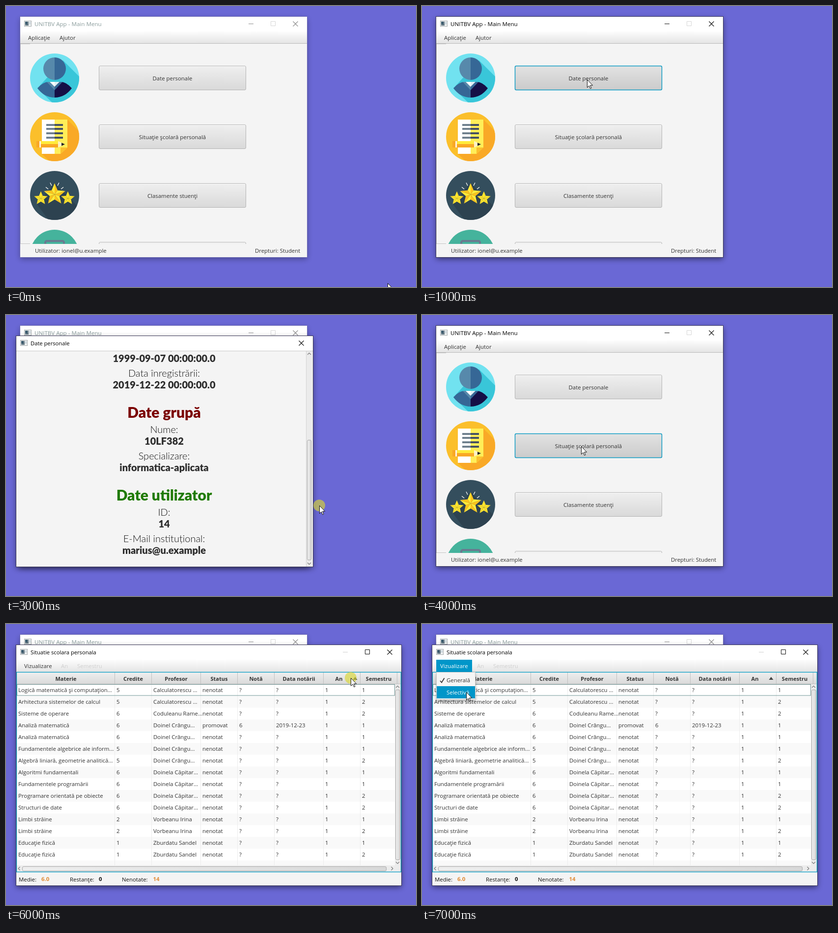
Recreate the animation shown at these times as an HTML page. Size 835 px wide and 574 px high, loop 8 s.

```html
<!DOCTYPE html>
<html lang="ro">
<head>
<meta charset="utf-8">
<title>Main Menu</title>
<style>
html, body { margin: 0; width: 100%; height: 100%; overflow: hidden; background: #6a68d5; }
svg { display: block; width: 835px; height: 574px; }
text { font: 11.4px "Open Sans", "Noto Sans", sans-serif; fill: #323232; white-space: pre; }
.mid { text-anchor: middle; }
.bold { font-weight: 700; font-size: 11px; }
.head { font: 900 30px Lato, sans-serif; }
.label { font: 300 20px Lato, sans-serif; fill: #111; }
.value { font: 900 20px Lato, sans-serif; fill: #2d2d2d; }
</style>
</head>
<body>
<svg viewBox="0 0 835 574">
  <defs>
    <linearGradient id="bar" x2="0" y2="1"><stop stop-color="#fdfdfd"/><stop offset="1" stop-color="#e4e4e4"/></linearGradient>
    <linearGradient id="btn" x2="0" y2="1"><stop stop-color="#efefef"/><stop offset="1" stop-color="#d9d9d9"/></linearGradient>
    <linearGradient id="press" x2="0" y2="1"><stop stop-color="#e2e2e2"/><stop offset="1" stop-color="#cbcbcb"/></linearGradient>
    <linearGradient id="thumb"><stop stop-color="#eeeeee"/><stop offset="1" stop-color="#d8d8d8"/></linearGradient>
    <filter id="soft" x="-10%" y="-10%" width="120%" height="120%"><feGaussianBlur stdDeviation="6"/></filter>
    <filter id="near" x="-20%" y="-20%" width="140%" height="150%"><feGaussianBlur stdDeviation="3"/></filter>
    <clipPath id="menuClip"><rect x="29" y="77" width="584" height="409"/></clipPath>
    <clipPath id="docClip"><rect x="22" y="74" width="589" height="439"/></clipPath>
    <clipPath id="disc"><circle r="50"/></clipPath>
  </defs>
  <g id="scene"></g>
</svg>
<script>
const STEP = 1000;
const steps = [
  { mouse: [777, 566] },
  { active: true, pressed: 0, mouse: [336, 150] },
  { view: "details", scroll: 0, mouse: [607, 190] },
  { view: "details", scroll: 299, mouse: [638, 389], click: true },
  { active: true, pressed: 1, mouse: [324, 268] },
  { view: "grades", mouse: [380, 188] },
  { view: "grades", sorted: true, mouse: [702, 110], click: true },
  { view: "grades", sorted: true, menu: true, mouse: [90, 139] }
];

const rect = (x, y, w, h, fill, more = "") =>
  `<rect x="${x}" y="${y}" width="${w}" height="${h}" fill="${fill}" ${more}/>`;
const text = (x, y, str, cls = "", style = "") =>
  `<text x="${x}" y="${y}" class="${cls}" style="${style}">${str}</text>`;
const path = (d, fill, more = "") => `<path d="${d}" fill="${fill}" ${more}/>`;
const line = (d, color, width = 1) => path(d, "none", `stroke="${color}" stroke-width="${width}"`);
const group = (attrs, body) => `<g ${attrs}>${body}</g>`;
const at = (x, y, body) => group(`transform="translate(${x} ${y})"`, body);

function appIcon(x, y) {
  return at(x, y, rect(.5, .5, 14, 11, "#f2f4f4", 'stroke="#a3a8aa"') +
    rect(2, 2, 7, 8, "#667a86") + rect(2, 2, 4, 5, "#33566a") +
    rect(10, 3, 3, 1, "#9db3c4") + rect(10, 5, 3, 1, "#9db3c4") + rect(10, 7, 3, 1, "#c3ccd2"));
}

function frame(x, y, w, h, title, o) {
  const mid = y + (o.mid || 15), right = x + w;
  let s = rect(x, y + 4, w, h, "#000", `filter="url(#soft)" opacity="${o.active ? .5 : .32}"`) +
    rect(x - 1, y - 1, w + 2, h + 2, o.active ? "#3c3a58" : "#7472b4") +
    rect(x, y, w, h, "#f4f4f4") + rect(x, y, w, 30, "#fff") +
    appIcon(x + 8, mid - 7) +
    text(x + 29, mid + 4, title, "", `font-size:${o.size || 11.2}px;fill:${o.active ? "#000" : "#8a9c9c"}`);
  const ink = o.active ? "#111" : "#8c8c8c";
  s += line(`M${right - 28.5} ${mid - 5.5}l10 10m0 -10l-10 10`, ink, 1.1);
  if (o.sizable) {
    s += line(`M${right - 119} ${mid - .5}h10`, o.min || ink) +
      line(`M${right - 73.5} ${mid - 5.5}h9v9h-9z`, o.max || "#d6d6d6");
  }
  return s;
}

function person() {
  const body = "M-35 21Q-24 8 -12 8H12Q24 8 35 21Q21 40 0 40Q-21 40 -35 21Z";
  const half = (x, w, d, fill) => `<svg x="${x}" y="-50" width="${w}" height="100" viewBox="${x} -50 ${w} 100">${path(d, fill)}</svg>`;
  const head = "M0 -42a23 23 0 0 1 0 46a23 23 0 0 1 0 -46z";
  return path("M17 -36L60 7V60H5L-35 21Z", "#39c6d9") +
    half(-50, 50, head, "#5789ab") + half(0, 50, head, "#366796") +
    half(-50, 50, body, "#366796") + half(0, 50, body, "#150f46") +
    path("M-16 8H-10L0 18V25Z", "#5789ab") + path("M16 8H10L0 18V25Z", "#366796") +
    path("M-10 8H0V18Z", "#fff") + path("M10 8H0V18Z", "#dff1f6");
}

function sheet() {
  let s = path("M26 -35L60 -1V60H0L-26 35Z", "#f9a927") +
    rect(-26, -35, 26, 70, "#fff") + path("M0 -35H26V22L12 35H0Z", "#ffee58") +
    path("M26 22H12V35Z", "#fbc02d");
  for (const y of [-26, -18, -9, 0]) s += rect(-17, y, 17, 4, "#6f808e") + rect(0, y, 17, 4, "#455062");
  return s + rect(-37, 9, 6, 13, "#f9a825") + rect(-31, 9, 3, 13, "#fff3e0") +
    rect(-28, 9, 35, 6, "#ffeb3b") + rect(-28, 15, 35, 7, "#f9a825") +
    path("M7 9L21 15.5L7 22Z", "#fff3c4") + path("M14 12.3L21 15.5L14 18.7Z", "#222");
}

function star(x, y, r, light, dark) {
  const pt = k => {
    const a = k * Math.PI / 5 - Math.PI / 2, d = k % 2 ? r * .45 : r;
    return `${(x + d * Math.cos(a)).toFixed(1)} ${(y + d * Math.sin(a)).toFixed(1)}`;
  };
  let s = "";
  for (let k = 0; k < 10; k++) s += path(`M${x} ${y}L${pt(k)}L${pt(k + 1)}Z`, k % 2 ? light : dark);
  return s;
}

function stars() {
  return path("M0 -25L60 35V60H-5L-36 18Z", "#2d4250") +
    star(-28, 6, 14.5, "#ffe92e", "#ffe02a") + star(27, 6, 14.5, "#ffe92e", "#ffe02a") +
    star(0, -2, 23, "#ffeb3b", "#fdc41c") +
    line("M-18 -17l5 4M-9 -26l3 6M9 -26l-3 6M18 -17l-5 4", "#f4f4f4", 1.4);
}

const board = () => rect(-19, -27, 38, 50, "none", 'rx="3" stroke="#697a90" stroke-width="4"');

const entries = [
  ["Date personale", "#71e2f0", person],
  ["Situație școlară personală", "#fbbf2b", sheet],
  ["Clasamente stuenți", "#344e5d", stars],
  ["", "#45b39c", board]
];

function mainWindow({ active, pressed }) {
  const items = entries.map(([label, color, icon], i) => {
    const y = 147 + i * 120, on = i === pressed;
    return at(99, y, `<circle r="50" fill="${color}"/>` + group('clip-path="url(#disc)"', icon())) +
      rect(189.5, y - 24.5, 299, 49, on ? "url(#press)" : "url(#btn)",
        `rx="2.5" stroke="${on ? "#0f9cc4" : "#b4b4b4"}" stroke-width="${on ? 1.5 : 1}"`) +
      (on ? "" : line(`M191 ${y - 23.5}h296`, "#fafafa")) +
      text(339, y + 5, label, "mid");
  }).join("");
  return frame(29, 22, 584, 491, "UNITBV App - Main Menu", { active, sizable: true, size: 11.6 }) +
    rect(29, 52, 584, 24, "url(#bar)") + rect(29, 76, 584, 1, "#b9b9b9") +
    text(45, 69, "Aplicație") + text(109, 69, "Ajutor") +
    rect(29, 77, 1, 409, "#d0d0d0") + rect(29, 77, 20, 1, "#c4c4c4") + rect(29, 485, 20, 1, "#c4c4c4") +
    group('clip-path="url(#menuClip)"', items) +
    text(59, 504, "Utilizator: ionel@u.example") + text(507, 504, "Drepturi: Student");
}

const arrows = {
  up: "M-3.5 2L0 -1.5L3.5 2", down: "M-3.5 -2L0 1.5L3.5 -2",
  left: "M2 -3.5L-1.5 0L2 3.5", right: "M-2 -3.5L1.5 0L-2 3.5"
};
const arrow = (dir, x, y) => at(x, y, line(arrows[dir], "#777", 1.1));
const thumb = (x, y, w, h) => rect(x + .5, y + .5, w - 1, h - 1, "url(#thumb)", 'rx="2.5" stroke="#aaa"');

const sections = [
  [124, "Date student", "#00007b", [
    ["Nume:", "Marius Plopănel"], ["Legitimație:", "1664"], ["CNP:", "1990907000017"],
    ["Domiciliu:", "Codlea, Brașov"], ["Data nașterii:", "1999-09-07 00:00:00.0"],
    ["Data înregistrării:", "2019-12-22 00:00:00.0"]]],
  [509, "Date grupă", "#7b0000", [["Nume:", "10LF382"], ["Specializare:", "informatica-aplicata"]]],
  [678, "Date utilizator", "#1f7a00", [["ID:", "14"], ["E-Mail instituțional:", "marius@u.example"]]]
];

function details({ scroll }) {
  const doc = sections.map(([y, title, color, rows]) =>
    text(322, y, title, "head mid", `fill:${color}`) +
    rows.map(([label, value], i) =>
      text(322, y + 31 + 54 * i, label, "label mid") + text(322, y + 55 + 54 * i, value, "value mid")).join("")
  ).join("");
  return frame(21, 43, 604, 471, "Date personale", { active: true }) +
    rect(21, 73, 604, 1, "#c8c8c8") +
    group('clip-path="url(#docClip)"', at(0, -scroll, doc)) +
    rect(611, 74, 13, 440, "#ebebeb") + rect(611, 74, 1, 440, "#d4d4d4") +
    arrow("up", 617.5, 79) + arrow("down", 617.5, 508) +
    thumb(613, scroll ? 255 : 86, 9, 246);
}

const teachers = ["Calculatorescu ...", "Coduleanu Rame...", "Doinel Crângu...",
  "Doinela Căpitar...", "Vorbeanu Irina", "Zburdatu Sandel"];
// subject, credits, teacher, semester
const courses = [
  ["Analiză matematică", 6, 2, 1, true],
  ["Analiză matematică", 6, 2, 1],
  ["Fundamentele algebrice ale inform...", 5, 2, 1],
  ["Algoritmi fundamentali", 6, 3, 1],
  ["Fundamentele programării", 6, 3, 1],
  ["Logică matematică și computațion...", 5, 0, 1],
  ["Limbi străine", 2, 4, 1],
  ["Educație fizică", 1, 5, 1],
  ["Algebră liniară, geometrie analitică...", 5, 2, 2],
  ["Arhitectura sistemelor de calcul", 5, 0, 2],
  ["Programare orientată pe obiecte", 6, 3, 2],
  ["Structuri de date", 6, 3, 2],
  ["Sisteme de operare", 6, 1, 2],
  ["Limbi străine", 2, 4, 2],
  ["Educație fizică", 1, 5, 2]
];
const columns = ["Materie", "Credite", "Profesor", "Status", "Notă", "Data notării", "An", "Semestru"];
const edges = [22, 221, 296, 396, 471, 546, 646, 721, 796];

function table(sorted) {
  const rows = sorted ? [...courses].sort((a, b) => a[2] - b[2]) : courses;
  let s = rect(22, 99, 782, 407, "#fff") + rect(22, 99, 782, 24, "url(#btn)") + rect(22, 122, 782, 1, "#c2c2c2");
  for (let i = 0; i < 16; i++) if (i % 2) s += rect(22, 123 + 24 * i, 770, i < 15 ? 24 : 10, "#f9f9f9");
  for (const x of edges.slice(1)) {
    s += rect(x, 99, 1, 24, "#c0c0c0");
    if (x < 790) s += rect(x, 123, 1, 370, "#ececec");
  }
  columns.forEach((name, i) => {
    const shift = sorted && name === "An" ? -6 : 0;
    s += text((edges[i] + edges[i + 1]) / 2 + .5 + shift, 116, name, "bold mid");
  });
  if (sorted) s += path("M706.5 114L711 108L715.5 114Z", "#444");
  rows.forEach(([subject, credits, who, term, passed], i) => {
    const cells = [subject, credits, teachers[who], passed ? "promovat" : "nenotat",
      passed ? 6 : "?", passed ? "2019-12-23" : "?", 1, term];
    cells.forEach((c, k) => s += text(edges[k] + (k ? 4 : 3), 139 + 24 * i, c));
  });
  return s + rect(22.5, 123.5, 769, 22.5, "none", 'stroke="#6f9494"') +
    rect(792, 123, 12, 371, "#ececec") + arrow("up", 797.5, 128) + arrow("down", 797.5, 488) +
    thumb(793, 134, 10, 348) +
    rect(22, 493, 782, 13, "#ececec") + arrow("left", 26.5, 499.5) + arrow("right", 786.5, 499.5) +
    thumb(33, 495, 742, 10) +
    rect(21.5, 98.5, 783, 408, "none", 'stroke="#12a0c6" stroke-width="1.4"');
}

function dropdown() {
  return rect(29, 73, 73, 25, "#0096c9") + text(37, 90, "Vizualizare", "", "fill:#fff") +
    rect(30, 102, 78, 55, "#000", 'filter="url(#near)" opacity=".4"') +
    rect(29.5, 98.5, 79, 56, "#f5f5f5", 'stroke="#c8c8c8"') +
    text(50, 119, "Generală") + line("M37 116l3 3.5l5.5 -9", "#333", 1.8) +
    rect(30, 127, 78, 25, "#0096c9") + text(50, 144, "Selectivă", "", "fill:#fff");
}

function grades({ sorted, menu }) {
  const faint = "fill:#cfcfcf", orange = "fill:#e08a34", stats = "font-size:11.4px;";
  return frame(21, 43, 784, 491, "Situatie scolara personala",
      { active: true, sizable: true, min: "#cfcfcf", max: "#111" }) +
    rect(21, 73, 784, 25, "url(#bar)") +
    text(37, 90, "Vizualizare") + text(112, 90, "An", "", faint) + text(145, 90, "Semestru", "", faint) +
    table(sorted) +
    text(26, 526, "Medie:", "", "fill:#111") + text(72, 525, "6.0", "bold", stats + orange) +
    text(130, 526, "Restanțe:", "", "fill:#111") + text(189, 525, "0", "bold", stats + "fill:#111") +
    text(236, 526, "Nenotate:", "", "fill:#111") + text(299.5, 525, "14", "bold", stats + orange) +
    (menu ? dropdown() : "");
}

function pointer({ mouse: [x, y], click }) {
  return at(x, y, (click ? '<circle r="12" fill="#d8d636" opacity=".65"/>' : "") +
    path("M.5 .5V16.5L4.2 13L6.7 18.7L9 17.7L6.5 12.1H11.6Z", "#fff", 'stroke="#111" stroke-linejoin="round"'));
}

const views = { details, grades };
const pictures = steps.map(s => mainWindow(s) + (s.view ? views[s.view](s) : "") + pointer(s));
const scene = document.getElementById("scene");
let shown = -1;

function tick() {
  const k = Math.floor(performance.now() / STEP) % steps.length;
  if (k !== shown) scene.innerHTML = pictures[shown = k];
  requestAnimationFrame(tick);
}
tick();
</script>
</body>
</html>
```
